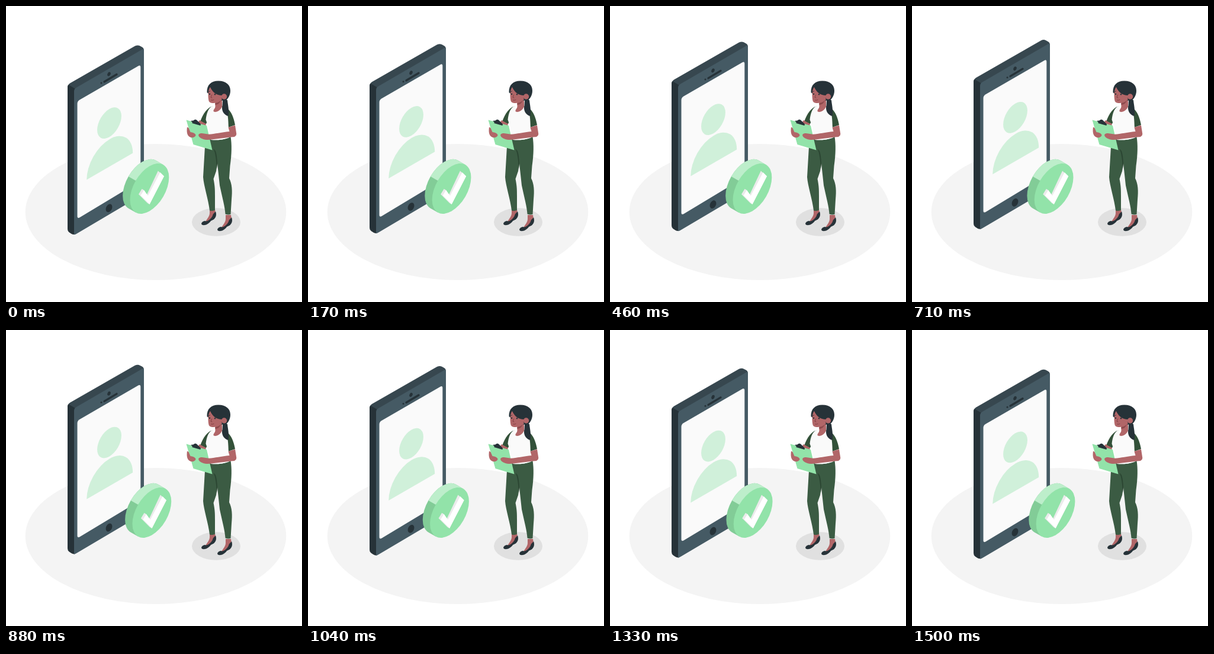
Recreate the animation shown at these times as an HTML page. Size 500 px wide and 500 px high, loop 1.54 s.

```html
<!DOCTYPE html>
<html lang="en">
<head>
<meta charset="utf-8">
<title>Identity check</title>
<style>
html, body { margin: 0; height: 100%; overflow: hidden; background: #fff; }
svg { display: block; width: 100%; height: 100%; }
.dark { fill: #263238; }
.skin { fill: #b16668; }
.mint { fill: #92e3a9; }
.pale { fill: #d0f0da; }
.sleeve { fill: #335139; }
.line { fill: none; stroke: #263238; stroke-linecap: round; }
</style>
</head>
<body>
<svg viewBox="0 0 500 500">
  <defs>
    <g id="foot">
      <path class="skin" d="M344 343L353 343 354 350C351 359 344 365 337 364 340 359 344 355 344 350Z"/>
      <path class="dark" d="M354 347C356 352 355 357 351 360.500L346 363C342 369 335 371.500 331 369.500 328.500 367 332 364 335.500 363 341 365 347 359 349 354 350 350 352 350 354 347Z"/>
    </g>
  </defs>

  <ellipse cx="253" cy="348" rx="220.300" ry="115" fill="#f4f4f4"/>
  <ellipse cx="355" cy="365" rx="41" ry="23.700" fill="#e0e0e0"/>

  <g id="phone">
    <path fill="#37474f" d="M104 138Q104 133 108 130.500L218 67.500Q222.500 65.500 226 67.300L230 69.500Q233 71 233 75L222 85 115 145Z"/>
    <path class="dark" d="M104 137Q104 134.500 105.500 133L116.500 139.500 116.500 386Q113 386.500 110 384.500L107 382.500Q104 380.500 104 376Z"/>
    <path fill="#455a64" d="M115 144Q115 140 118.500 138L231.500 72.500Q233 73 233 76V313Q233 317 229.500 319.500L120 384.200Q117 386.200 115 386.300Z"/>
    <path fill="#fafafa" d="M120.500 165Q120.500 161 124 158.800L224 101Q227.300 99.500 227.300 103.500V291Q227.300 295 224 297.200L124 357.500Q120.500 359 120.500 355Z"/>
    <path class="line" stroke-width="3.300" d="M166 128L187 115.500"/>
    <ellipse class="dark" cx="174" cy="115" rx="2.500" ry="3.600" transform="rotate(25 174 115)"/>
    <circle class="dark" cx="161" cy="130" r="1.500"/>
    <ellipse class="dark" cx="174" cy="341.300" rx="5" ry="7.200" transform="rotate(25 174 341.300)"/>
    <circle class="pale" r="23.600" transform="matrix(.866 -.5 0 1 174.500 197.700)"/>
    <path class="pale" d="M-45 0A45 46 0 0 1 45 0Z" transform="matrix(.866 -.5 0 1 175.200 271)"/>
  </g>

  <g id="coin">
    <g transform="matrix(.866 -.5 0 1 242.400 308.500)">
      <path fill="#82cc97" d="M26.900-26.900l-14.200-14.200A38 38 0 0 0-41.100 12.700l14.200 14.200Z"/>
      <path fill="#bdeecb" d="M26.900-26.900l-14.200-14.200A38 38 0 0 0-41.100-41.100l14.200 14.200Z"/>
      <circle class="mint" r="38"/>
    </g>
    <path fill="#ebebeb" d="M224 318L229.500 309 233 311 238 318.500 256.800 278.500 267 287.500 242.500 335 239 333Z"/>
    <path fill="#fff" d="M227.500 320L233 311 239.800 320.500 260.500 281 267 287.500 242.500 335Z"/>
  </g>

  <g id="woman">
    <use href="#foot"/>
    <use href="#foot" x="27" y="10"/>
    <path fill="#3b5b43" d="M345 224C356 228 370 226 379.500 221 381.500 233 381.500 250 378.500 270L377 291C382 301 382.500 312 381 327L379.500 352Q375 353 370.500 351.500C370 340 365 322 361 303L357 266 355 279 350.500 292C353 305 353 310 353 322V345Q348 347 344 345.500C342 327 334 304 333 289L336 238Z"/>
    <path fill="#2b4532" d="M351 242Q356 243 357 266L356 275Q355 252 351 242Z"/>
    <path class="skin" d="M327 193L338 198 337 204 324 197Z"/>
    <path class="sleeve" d="M350 169C340 171 333 182 328.500 194L338 199 346 184Z"/>
    <path class="sleeve" d="M364 169C376 171 383 180 387 201L375.500 205 368 186Z"/>
    <path fill="#fafafa" d="M349.500 168.500C342 172 339 180 337.500 192L341 202 346 226Q362 228 376.500 222L375.500 196C375 182 373 174 365 169 362 178 358 180 354 179Z"/>
    <path class="skin" d="M353 160L365 157 365 170C362 177 356 180 351 178.500 349 176 353 174 353.500 170Z"/>
    <path fill="#8c4a4d" d="M353.500 164Q360 163 363 159 361 166 353.500 167Z"/>
    <path class="dark" d="M339.500 146C339 133 347 126.500 358 126.500 371 126 379 133 379 143 379 151 375 157 371 159.500L356 160 342 148Z"/>
    <path class="skin" d="M345 137C341 141 341 153 342.500 160 343.500 164.500 351 165 357 162.500L364.500 159V151C356 151 349 146 345 137Z"/>
    <circle class="skin" cx="368.500" cy="153" r="4.700"/>
    <path class="dark" d="M366 159Q371 157 374 159C374.500 166 377.500 176 375.500 186 367 184 363.500 175 365.500 168Z"/>
    <circle class="dark" cx="344" cy="148.700" r="1.200"/>
    <circle class="dark" cx="353" cy="149.300" r="1.200"/>
    <path class="line" stroke-width=".9" d="M342.500 145L344.500 143.800M351.500 145.200Q353.500 144.500 355 146"/>
    <path class="line" stroke="#7d3c40" style="stroke:#7d3c40" stroke-width=".9" d="M347.500 150L346 154.500 348 155M346.500 159Q349 159.800 351 158.500"/>

    <path class="mint" d="M304.500 192.500L339 202 348.500 243.500 316.500 234Z"/>
    <path class="dark" d="M312 194L316.500 193.500Q319.500 190.500 322.500 193L325.500 196 329 199.500 328.500 202 314.500 198 314.500 196Z"/>
    <path class="skin" d="M306 204.500C305 212 305.500 218 310 221 314 223.500 320 222 320.500 218 320 215 315 213.500 311.500 213L308.500 206Z"/>
    <path class="skin" d="M375.500 205L387 201.500 389.300 216C389 220 386 221.500 382 221.300L347 225.500C338 227 329.500 225 326 220.500 323.500 216.500 327 215 331 215L343 216.800C352 216 364 213.500 377.500 212Z"/>
  </g>
</svg>
<script>
const LOOP = 1540, STEPS = 37, PERIOD = 1500;
// Horizontal shake, one stop per tenth of the period
const SHAKE = [0, -1, 2, -4, 4, -4, 4, -4, 2, -1, 0];
const phone = document.getElementById('phone');
const coin = document.getElementById('coin');

function draw(time) {
  const step = Math.floor(time % LOOP / LOOP * STEPS + .1) % STEPS;
  const phase = (step * 41.1 + 32) % PERIOD / PERIOD;
  const lift = 10 * (1 - Math.abs(1 - 2 * phase));
  const stop = Math.floor(phase * 10);
  const shift = SHAKE[stop] + (SHAKE[stop + 1] - SHAKE[stop]) * (phase * 10 - stop);
  phone.setAttribute('transform', `translate(0 ${.4 - lift})`);
  coin.setAttribute('transform', `translate(${shift + .2} 0)`);
}

const start = performance.now();
function tick() {
  draw(performance.now() - start);
  requestAnimationFrame(tick);
}
tick();
</script>
</body>
</html>
```
